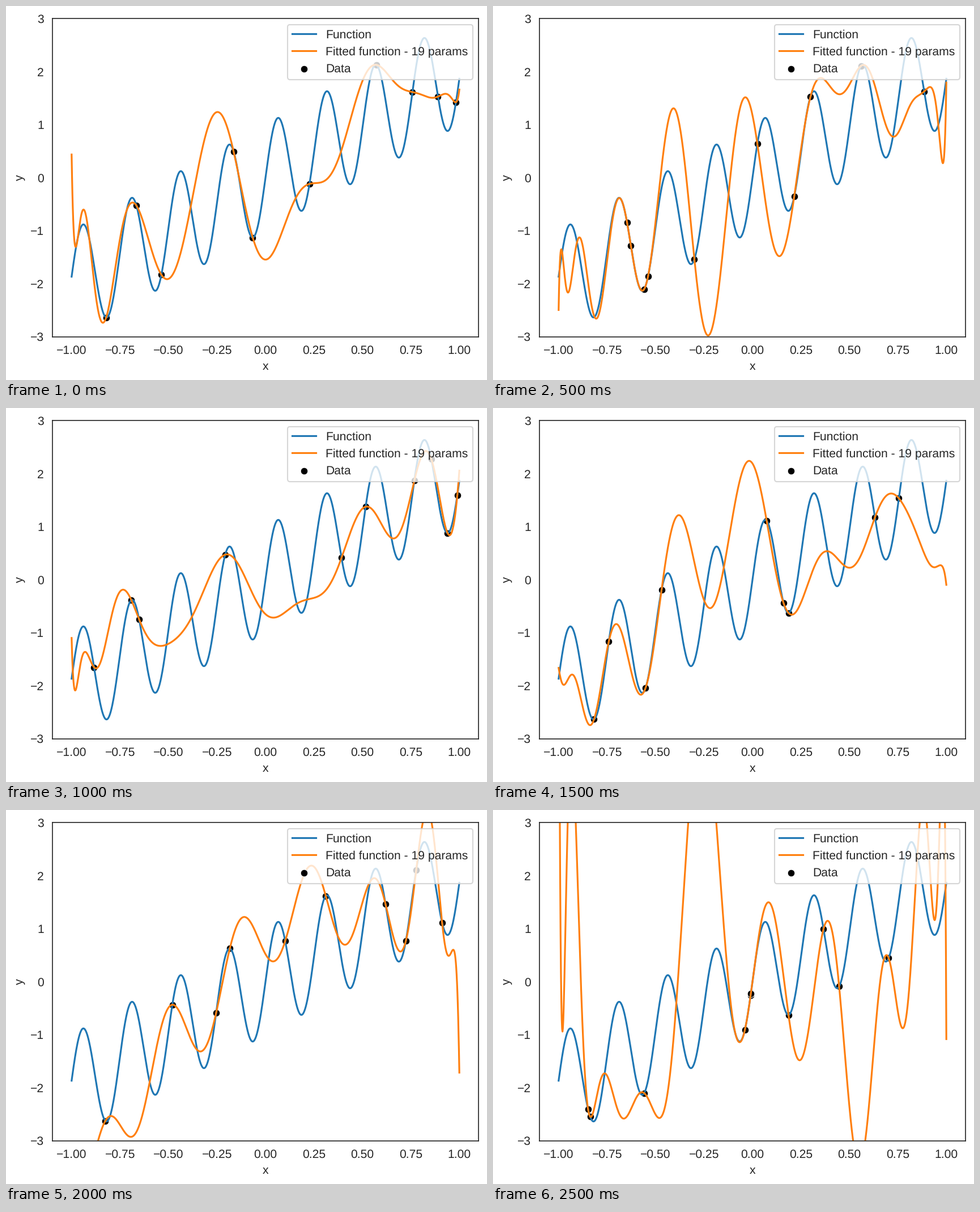
Recreate the animation shown at these times as a matplotlib script. Size 849 by 660 pixels, loop 3 s.

```python
import numpy as np
import matplotlib.pyplot as plt
from matplotlib.animation import FuncAnimation
from numpy.polynomial.legendre import legvander

W, H, DPI = 849, 660, 100
S = 1.518  # scale of point sizes at this dpi
PARAMS = 19
INK = "0.15"

# x of the ten training points in each draw
SAMPLES = np.array([
    [-.8216, -.6659, -.537, -.1645, -.0658, .227, .573, .758, .8897, .9825],
    [-.6469, -.6272, -.559, -.5388, -.2997, .0252, .2156, .2995, .56, .8854],
    [-.8843, -.692, -.652, -.2076, .3922, .5167, .7675, .8558, .939, .9896],
    [-.8173, -.741, -.553, -.5512, -.469, .0731, .1602, .1857, .6318, .755],
    [-.826, -.4805, -.2546, -.184, .1017, .311, .619, .7242, .7775, .911],
    [-.848, -.8372, -.5585, -.039, -.0096, -.0083, .1857, .3664, .447, .7025],
])


def func(x):
    return 2 * x + np.sin(25 * x)


def features(x):
    """Legendre polynomials of degree 1 to PARAMS."""
    return legvander(x, PARAMS)[:, 1:]


def fit(xs):
    """Minimum-norm least squares through the training points."""
    return np.linalg.pinv(features(xs)) @ func(xs)


plt.rcParams.update({
    "font.family": "Liberation Sans",
    "font.size": 10 * S,
    "text.hinting": "none",
    "text.color": INK,
    "axes.linewidth": .8 * S,
    "axes.labelpad": 4 * S,
    "axes.edgecolor": INK,
    "axes.labelcolor": INK,
    "lines.linewidth": 1.5 * S,
    "patch.linewidth": S,
})
for axis in ("xtick", "ytick"):
    plt.rcParams.update({f"{axis}.major.size": 3.5 * S,
                         f"{axis}.major.pad": 3.5 * S,
                         f"{axis}.color": INK})

fig = plt.figure(figsize=(W / DPI, H / DPI), dpi=DPI, facecolor="white")
ax = fig.add_axes([81.6 / W, 76.45 / H, 752.8 / W, 561.1 / H])
ax.set(xlim=(-1.1, 1.1), ylim=(-3, 3), xlabel="x", ylabel="y")
ax.set_xticks(np.linspace(-1, 1, 9))
ax.tick_params(left=False, bottom=False)

grid = np.linspace(-1, 1, 1001)
ax.plot(grid, func(grid), color="#1f77b4", label="Function")
fitted, = ax.plot(grid, grid, color="#ff7f0e",
                  label=f"Fitted function - {PARAMS} params")
dots = ax.scatter([], [], s=(6 * S)**2, color="black", edgecolor="white",
                  linewidths=.48 * S, label="Data")
ax.legend(loc="upper right", framealpha=.8, edgecolor="0.8")


def draw(i):
    xs = SAMPLES[i]
    fitted.set_ydata(features(grid) @ fit(xs))
    dots.set_offsets(np.column_stack([xs, func(xs)]))
    return fitted, dots


anim = FuncAnimation(fig, draw, frames=len(SAMPLES), interval=500,
                     init_func=lambda: draw(0), repeat=True, repeat_delay=0)
plt.show()
```
